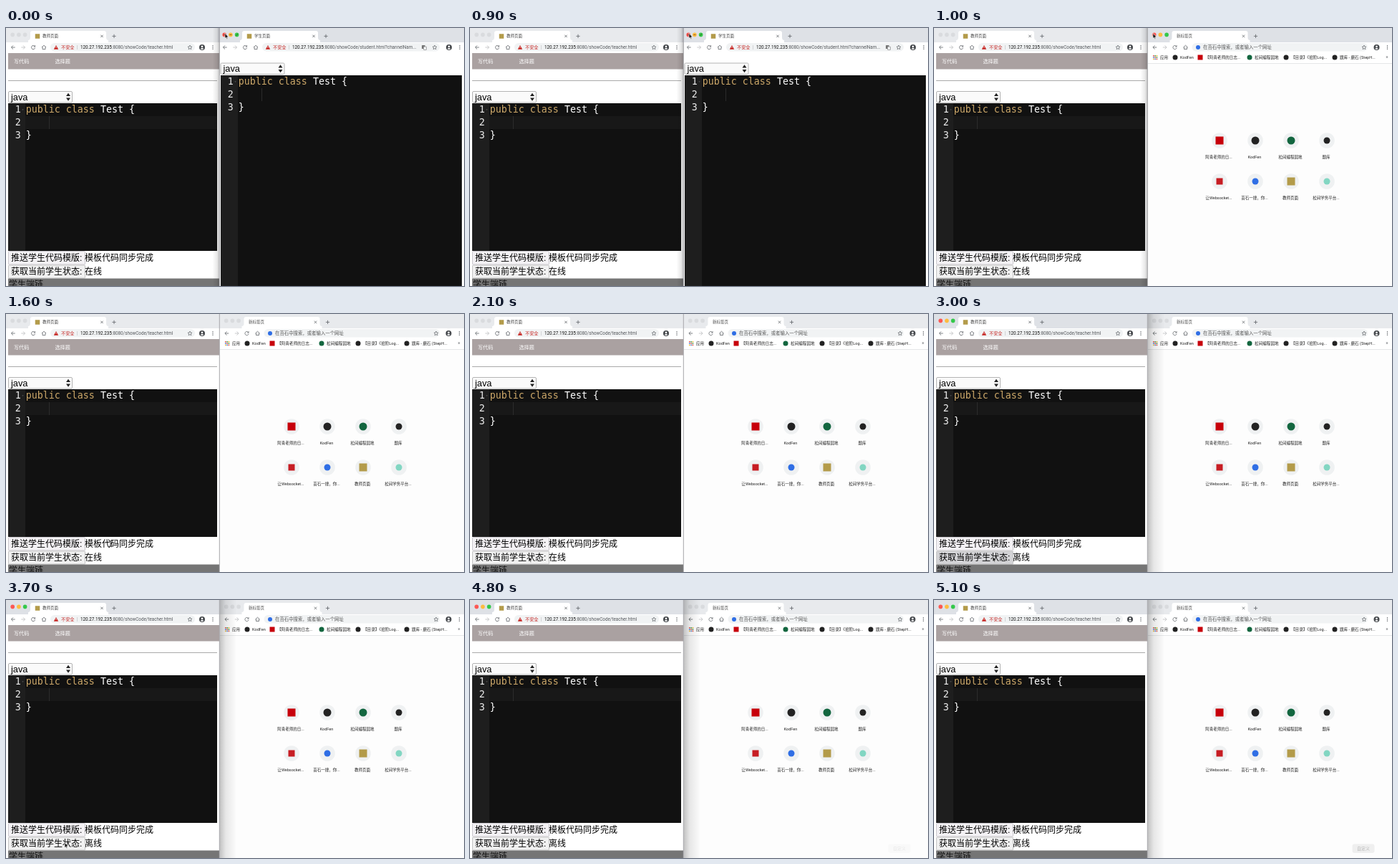
These frames come from a looping animation (640x360 px, 5.2 s). An HTML page with a canvas:

```html
<!DOCTYPE html>
<html lang="zh">
<head>
<meta charset="utf-8">
<style>
  html, body { margin: 0; width: 100%; height: 100%; overflow: hidden; background: #fff; }
  canvas { display: block; }
</style>
</head>
<body>
<canvas id="stage" width="640" height="360"></canvas>
<script>
const c = document.getElementById('stage').getContext('2d');
const UI = 'Roboto, "Noto Sans CJK SC", "Noto Sans CJK", sans-serif';
const PAGE = '"Liberation Sans", "Noto Sans CJK SC", "Noto Sans CJK", sans-serif';
const CODE = '"DejaVu Sans Mono", monospace';
const GREY = '#5f6368';

function rect(x, y, w, h, color) {
  c.fillStyle = color;
  c.fillRect(x, y, w, h);
}
function round(x, y, w, h, r, fill, stroke, width = 1) {
  c.beginPath();
  c.roundRect(x, y, w, h, r);
  if (fill) { c.fillStyle = fill; c.fill(); }
  if (stroke) { c.strokeStyle = stroke; c.lineWidth = width; c.stroke(); }
}
function dot(x, y, r, color) {
  c.beginPath();
  c.arc(x, y, r, 0, 7);
  c.fillStyle = color;
  c.fill();
}
function square(x, y, size, color) {
  rect(x - size / 2, y - size / 2, size, size, color);
}
function path(d, x, y, stroke, fill, width = 0.8) {
  const p = new Path2D(d);
  c.save();
  c.translate(x, y);
  if (fill) { c.fillStyle = fill; c.fill(p); }
  if (stroke) { c.strokeStyle = stroke; c.lineWidth = width; c.stroke(p); }
  c.restore();
}
function text(s, x, y, size, color = '#222', font = UI, align = 'left') {
  c.font = size + 'px ' + font;
  c.textAlign = align;
  c.fillStyle = color;
  c.fillText(s, x, y);
  return c.measureText(s).width;
}

function lights(x, active, hover) {
  ['#fc5753', '#fdbc40', '#34c84a'].forEach((color, i) => {
    const cx = x + i * 8.7;
    dot(cx, 9.4, 2.8, active ? color : '#d9dbde');
    if (hover) path(['M-1.2-1.2L1.2 1.2M1.2-1.2L-1.2 1.2', 'M-1.5 0H1.5', 'M-1.2 1.2L1.2-1.2'][i],
      cx, 9.4, 'rgba(60,20,0,.7)');
  });
}

// Tab strip and toolbar shared by both browser windows
function browser(x, w, o) {
  rect(x, 0, w, 20, o.active ? '#dee1e6' : '#e8eaed');
  lights(x + 9.2, o.active, o.hover);
  path('M0 17Q3 17 3 13V7Q3 4 6 4H106Q109 4 109 7V13Q109 17 112 17V20H0Z', x + 31, 0, null, '#fff');
  if (o.icon) square(x + 44, 11.5, 6.5, '#b39b4a');
  text(o.title, x + (o.icon ? 51 : 40.5), 13.4, 5.5, '#444');
  path('M-1.7-1.7L1.7 1.7M1.7-1.7L-1.7 1.7', x + 134, 11.4, GREY);
  path('M-2.6 0H2.6M0-2.6V2.6', x + 151, 11.4, GREY);

  rect(x, 20, w, 15, '#fff');
  path('M2.7 0H-2.5M0-2.6L-2.6 0L0 2.6', x + 10, 27, GREY);
  path('M-2.7 0H2.5M0-2.6L2.6 0L0 2.6', x + 24, 27, '#babcbe');
  path('M2.2-1.4A2.6 2.6 0 1 0 2.6 .6M2.6-2.8V-.9H.6', x + 38, 27, GREY);
  path('M-3 0L0-2.8L3 0M-2-.7V2.6H2V-.7', x + 53, 27, GREY);
  round(x + 62, 21, w - 96, 11.5, 5.7, '#f1f3f4');

  const { star, end } = o;
  path('M0-3L.9-1L3-.8L1.4 .6L1.9 2.7L0 1.6L-1.9 2.7L-1.4 .6L-3-.8L-.9-1Z', star, 27, GREY, null, 0.7);
  dot(end - 15, 27, 4, '#45484c');
  dot(end - 15, 25.9, 1.3, '#fff');
  path('M-2.3 2Q0-.2 2.3 2Q0 4-2.3 2Z', end - 15, 27, null, '#fff');
  [-2.2, 0, 2.2].forEach(d => dot(end, 27 + d, 0.7, GREY));
}

function address(x, rest) {
  path('M0-3L3.2 2.7H-3.2Z', x + 70, 27, null, '#c5221f');
  rect(x + 69.6, 25.7, 0.8, 2, '#fff');
  text('不安全', x + 77, 29.4, 6.2, '#c5221f');
  rect(x + 99, 24, 0.7, 6, '#c4c6c9');
  const w = text('120.27.192.235', x + 104, 29.2, 6.3, '#111');
  text(rest, x + 104 + w, 29.2, 6.3, '#55585c');
}

function select(x, y) {
  round(x + 0.5, y + 0.5, 89, 15.5, 1.5, '#fafafa', '#b4b4b4');
  text('java', x + 4, y + 12.8, 12.8, '#000', PAGE);
  path('M-3-1.3L0-5.5L3-1.3ZM-3 1.3L0 5.5L3 1.3Z', x + 84, y + 8.3, null, '#222');
}

function editor(x, y, w, h, activeLine) {
  rect(x, y, w, h, '#111');
  rect(x, y, 24, h, '#1e1e1e');
  if (activeLine) rect(x + 24, y + 18, w - 24, 18, '#181818');
  rect(x + 57, y + 18, 0.8, 18, '#333');
  const line = i => y + 13.2 + 18 * i;
  [1, 2, 3].forEach((n, i) => text(n, x + 17.8, line(i), 13.3, '#eee', CODE, 'right'));
  path('M-1.2-.7H1.2L0 1Z', x + 20.5, y + 9, null, '#555');
  text('public class', x + 24.8, line(0), 13.3, '#cda869', CODE);
  text('Test {', x + 128.9, line(0), 13.3, '#fff', CODE);
  text('}', x + 24.8, line(2), 13.3, '#fff', CODE);
}

function teacher(t) {
  rect(0, 0, 299, 360, '#fff');
  browser(0, 298, { active: t >= 2300, title: '教师页面', icon: true, star: 257, end: 289 });
  address(0, ':8080/showCode/teacher.html');
  rect(3, 35, 295, 22.5, '#aaa1a1');
  text('写代码', 11, 48.9, 7.1, '#fff');
  text('选择题', 68.5, 48.9, 7.1, '#fff');
  rect(3, 73, 292, 1, '#aaa');
  select(3, 88);
  editor(3, 105, 292, 206, true);

  const pressed = t >= 2900 && t < 3100;
  round(3.5, 311.5, 107, 18.5, 1, '#f4f2f5', '#c9c7cc');
  round(3.5, 331, 107, 18, 1, pressed ? '#d3d3d6' : '#f1f1f1', '#c4c4c4');
  text('推送学生代码模版:', 7, 325.2, 12, '#000', PAGE);
  text('模板代码同步完成', 110, 325.2, 12, '#000', PAGE);
  text('获取当前学生状态:', 7, 344.2, 12, '#000', PAGE);
  text(t < 3000 ? '在线' : '离线', 110, 344.2, 12, '#000', PAGE);
  if (t >= 2300 && t < 2900) round(3, 311.3, 107.7, 19, 1.5, null, '#82a9e6', 1.4);

  rect(3, 349.5, 295, 11, '#757575');
  text('学生端链', 4, 362.2, 12, '#111', PAGE);
}

function student() {
  rect(299, 0, 341, 360, '#fff');
  browser(296, 344, { active: true, hover: true, title: '学生页面', icon: true, star: 599, end: 634 });
  address(296, ':8080/showCode/student.html?channelNam...');
  round(581, 24, 4.5, 5, 0.5, '#777');
  round(583.5, 26, 4, 4.5, 0.5, '#f1f3f4', '#777', 0.6);
  select(299.5, 48.5);
  editor(300, 66, 337, 294, false);
}

const BOOKMARKS = [
  [337, 344, '#222', 'KodFen'],
  [372, 379, '#c7000b', '【阿青老师的日志...', true],
  [441, 448, '#12663f', '松间编程园地'],
  [492, 499, '#222', '【目录】《拾阶Log...'],
  [560, 567, '#222', '题库 - 磨石 (StepH...']
];
const SHORTCUTS = [
  ['阿青老师的日...', '#c7000b', 11, true],
  ['KodFen', '#222', 11],
  ['松间编程园地', '#12663f', 11],
  ['题库', '#222', 9],
  ['让Websocket...', '#c71d23', 9, true],
  ['苔石一搜，你...', '#2f6ee5', 9],
  ['教师页面', '#b39b4a', 11, true],
  ['松间学务平台...', '#82d6c2', 9]
];
function mark(x, y, size, color, isSquare) {
  isSquare ? square(x, y, size, color) : dot(x, y, size / 2, color);
}

function newTab(t) {
  rect(299, 0, 341, 360, '#fdfdfd');
  browser(298.5, 341.5, { active: t < 1500, title: '新标签页', star: 601, end: 633.5 });
  rect(299, 35, 341, 14, '#fff');
  dot(369, 27, 3, '#2f6ee5');
  text('在苔石中搜索，或者输入一个网址', 376, 29.4, 6.4, '#555');

  for (let i = 0; i < 9; i++)
    square(306.8 + i % 3 * 2.3, 38.8 + (i / 3 | 0) * 2.3, 1.6, ['#e04a3f', '#3b9b58', '#e5b52c', '#4a7fd8'][i % 4]);
  text('应用', 316, 43.1, 5.5);
  for (const [ix, x, color, label, isSquare] of BOOKMARKS) {
    mark(ix, 41, 7, color, isSquare);
    text(label, x, 43.1, 5.6);
  }
  text('»', 633, 43, 7, GREY, UI, 'center');
  rect(299, 49, 341, 0.7, '#dcdee0');

  SHORTCUTS.forEach(([label, color, size, isSquare], i) => {
    const x = 399 + i % 4 * 50, y = i < 4 ? 157 : 214;
    dot(x, y, 10.8, '#eff1f2');
    mark(x, y, size, color, isSquare);
    text(label, x - 1, y + 25.2, 5.5, '#222', UI, 'center');
  });

  if (t >= 4800) {
    c.globalAlpha = Math.min(1, (t - 4700) / 400);
    round(584.5, 340.5, 31, 12.5, 3, '#efefef');
    text('自定义', 600, 349, 6, '#b5b5b5', UI, 'center');
    c.globalAlpha = 1;
  }
}

// Soft shadow the active window casts on its neighbour, away from the shared edge
function shadow(reach) {
  const edge = 298.5, g = c.createLinearGradient(edge, 0, edge + reach, 0);
  g.addColorStop(0, 'rgba(0,0,0,.24)');
  g.addColorStop(0.35, 'rgba(0,0,0,.09)');
  g.addColorStop(1, 'rgba(0,0,0,0)');
  rect(edge, 0, reach, 360, g);
}

function cursor(t) {
  if (t >= 4800) return;
  const ease = (from, to) => {
    const p = Math.max(0, Math.min(1, (t - from) / (to - from)));
    return p * p * (3 - 2 * p);
  };
  const a = ease(1200, 1600), b = ease(1700, 2100);
  const x = 306 - 160 * a - 64 * b, y = 7.5 + 313 * a + 18 * b;
  if (t >= 1600 && t < 1900)
    path('M-1.5-4Q0-4 0-3V3Q0 4-1.5 4M1.5-4Q0-4 0-3M0 3Q0 4 1.5 4', x, y, '#222', null, 0.9);
  else
    path('M0 0V7L1.6 5.6L2.7 8L3.8 7.5L2.8 5.2H5Z', x, y, '#fff', '#111', 0.6);
}

function draw(now) {
  const t = Math.floor(now % 5200 / 100) * 100;
  teacher(t);
  t < 1000 ? student() : newTab(t);
  if (t < 1500) shadow(-10);
  if (t >= 2300) shadow(24);
  rect(297.8, 0, 1, 360, '#a5a5a8');
  cursor(t);
}
function loop() {
  draw(performance.now());
  requestAnimationFrame(loop);
}
loop();
</script>
</body>
</html>
```
